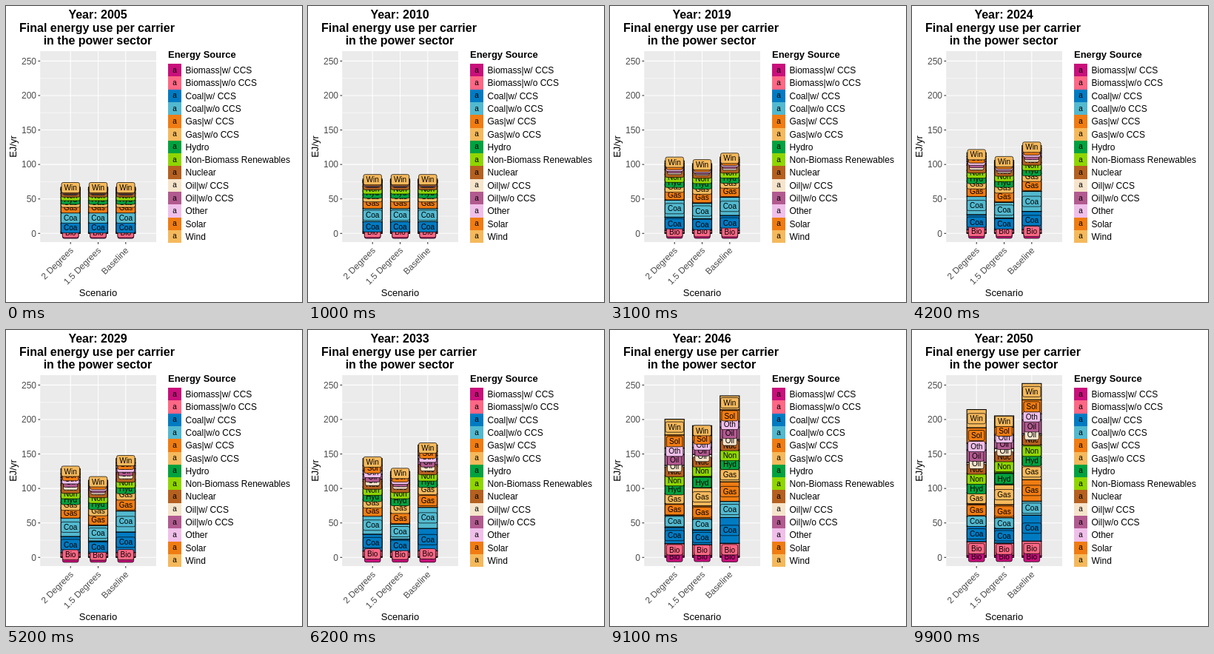
An HTML page for the animation above (10 s loop, 400x400 px).

```html
<!DOCTYPE html>
<html lang="en">
<head>
<meta charset="utf-8">
<title>Final energy use per carrier</title>
<style>
  html, body { margin: 0; width: 100%; height: 100%; overflow: hidden; background: #fff; }
  svg { display: block; width: 400px; height: 400px; font-family: "Liberation Sans", Arial, sans-serif; }
</style>
</head>
<body>
<svg id="chart" viewBox="0 0 400 400"></svg>
<script>
const LOOP = 10000, STEP = 100, LAST = LOOP / STEP - 1;
const SPLIT = 19;         // step at which the scenarios start to diverge
const START_SHARE = 0.75; // first bar height relative to the one at the split
const BASE = 307.3, UNIT = 0.9317, BAR = 26.1;
const PANEL = { x: 46.2, y: 61, width: 156.8, height: 258 };

// lag: how far growth trails a straight line; swing: strength of the mid-period humps
const scenarios = [
  { name: '2 Degrees', x: 87.2, lag: 0.1, swing: 1 },
  { name: '1.5 Degrees', x: 124.5, lag: 0.235, swing: 0.2 },
  { name: 'Baseline', x: 161.8, lag: 0.08, swing: 1.2 }
];

// split: shared height in px at the split; hump: mid-period surplus; ends: final height per scenario
const carriers = [
  { name: 'Biomass|w/ CCS', color: '#c90f7b', split: 0.5, hump: -0.3, ends: [2.3, 2.8, 2] },
  { name: 'Biomass|w/o CCS', color: '#ff6785', split: 2.3, hump: -2, ends: [19, 16.5, 20] },
  { name: 'Coal|w/ CCS', color: '#007bc2', split: 14.5, hump: 5.4, ends: [21, 20, 35] },
  { name: 'Coal|w/o CCS', color: '#52b9cf', split: 21, hump: 7, ends: [13, 14, 19] },
  { name: 'Gas|w/ CCS', color: '#f07c12', split: 15.5, hump: -2.8, ends: [17, 18, 29] },
  { name: 'Gas|w/o CCS', color: '#f5b95c', split: 5, hump: -0.5, ends: [15, 27, 21] },
  { name: 'Hydro', color: '#00a23f', split: 6, hump: 0.3, ends: [11, 16, 9] },
  { name: 'Non-Biomass Renewables', color: '#8fd600', split: 7, hump: -1.9, ends: [15, 17, 17] },
  { name: 'Nuclear', color: '#b5601f', split: 6, hump: -1, ends: [12, 10, 13] },
  { name: 'Oil|w/ CCS', color: '#f6e4cb', split: 0.8, hump: 0.7, ends: [3, 6, 2] },
  { name: 'Oil|w/o CCS', color: '#b25a90', split: 0.8, hump: -0.7, ends: [17, 11, 19] },
  { name: 'Other', color: '#f0bfea', split: 0.8, hump: 0.2, ends: [9, 7, 8] },
  { name: 'Solar', color: '#f07c12', split: 1.2, hump: -2.8, ends: [21, 11, 19] },
  { name: 'Wind', color: '#f5b95c', split: 2, hump: -2.5, ends: [24.5, 15, 22] }
];

const svg = document.getElementById('chart');

function add(tag, attrs, parent = svg) {
  const el = document.createElementNS('http://www.w3.org/2000/svg', tag);
  for (const key in attrs) el.setAttribute(key, attrs[key]);
  parent.appendChild(el);
  return el;
}

function text(content, x, y, size, attrs = {}, parent = svg) {
  const el = add('text', { x, y, 'font-size': size, ...attrs }, parent);
  el.textContent = content;
  return el;
}

function line(x1, y1, x2, y2, stroke, width) {
  add('line', { x1, y1, x2, y2, stroke, 'stroke-width': width });
}

const middle = { 'text-anchor': 'middle' };
const title = { ...middle, 'font-weight': 'bold' };
const right = PANEL.x + PANEL.width, bottom = PANEL.y + PANEL.height;

add('rect', { width: 400, height: 400, fill: '#fff' });
const yearText = text('', 124, 17, 16, title);
text('Final energy use per carrier', 123, 35, 16, title);
text('in the power sector', 124, 52, 16, title);

add('rect', { ...PANEL, fill: '#ebebeb' });
for (let value = 25; value < 250; value += 50) {
  line(PANEL.x, BASE - value * UNIT, right, BASE - value * UNIT, '#fff', 0.53);
}
for (let value = 0; value <= 250; value += 50) {
  const y = BASE - value * UNIT;
  line(PANEL.x, y, right, y, '#fff', 1.07);
  line(PANEL.x - 2.8, y, PANEL.x, y, '#333', 1.07);
  text(value, 41, y + 4.2, 12, { 'text-anchor': 'end', fill: '#4d4d4d' });
}
for (const { name, x } of scenarios) {
  line(x, PANEL.y, x, bottom, '#fff', 1.07);
  line(x, bottom, x, bottom + 2.8, '#333', 1.07);
  text(name, 0, 0, 12, {
    'text-anchor': 'end', fill: '#4d4d4d', transform: `translate(${x + 4.5} 331) rotate(-45)`
  });
}
text('Scenario', 124.5, 392, 13, middle);
text('EJ/yr', 0, 0, 13, { ...middle, transform: 'translate(14 190) rotate(-90)' });

text('Energy Source', 219, 70, 13, { 'font-weight': 'bold' });
carriers.forEach(({ name, color }, i) => {
  const y = 78.2 + i * 17.28;
  add('rect', { x: 219, y, width: 18, height: 17.28, fill: color, 'shape-rendering': 'crispEdges' });
  text('a', 228, y + 11.6, 10, middle);
  text(name, 242.5, y + 13, 12);
});

const barLayer = add('g', { stroke: '#000', 'stroke-width': 1.07 });
const labelLayer = add('g', {});
const parts = carriers.flatMap(carrier => scenarios.map(({ x }, s) => {
  const { name, color: fill } = carrier;
  const bar = add('rect', { x: x - BAR / 2, width: BAR, fill }, barLayer);
  const label = add('g', {}, labelLayer);
  const box = add('rect', { y: -7, height: 14, rx: 2.2, fill, stroke: '#000', 'stroke-width': 0.7 }, label);
  const caption = text(name.slice(0, 3), 0, 3.6, 10, middle, label);
  const width = caption.getComputedTextLength() + 7.2;
  box.setAttribute('x', -width / 2);
  box.setAttribute('width', width);
  return { carrier, s, bar, label };
}));

function heightAt({ split, hump, ends }, s, step) {
  if (step < SPLIT) return split * (START_SHARE + (1 - START_SHARE) * step / SPLIT);
  const { lag, swing } = scenarios[s];
  const p = (step - SPLIT) / (LAST - SPLIT);
  const arch = Math.sin(Math.PI * p);
  const growth = p - lag * arch * arch;
  return split + (ends[s] - split) * growth + hump * swing * arch;
}

function draw(step) {
  yearText.textContent = 'Year: ' + Math.round(2005 + 45 * step / LAST);
  const tops = scenarios.map(() => BASE);
  for (const { carrier, s, bar, label } of parts) {
    const height = Math.max(0, heightAt(carrier, s, step));
    tops[s] -= height;
    bar.setAttribute('y', tops[s]);
    bar.setAttribute('height', height);
    label.setAttribute('transform', `translate(${scenarios[s].x} ${tops[s] + height / 2})`);
  }
}

const begin = performance.now();
function tick() {
  draw(Math.floor((performance.now() - begin) % LOOP / STEP));
  requestAnimationFrame(tick);
}
tick();
</script>
</body>
</html>
```
